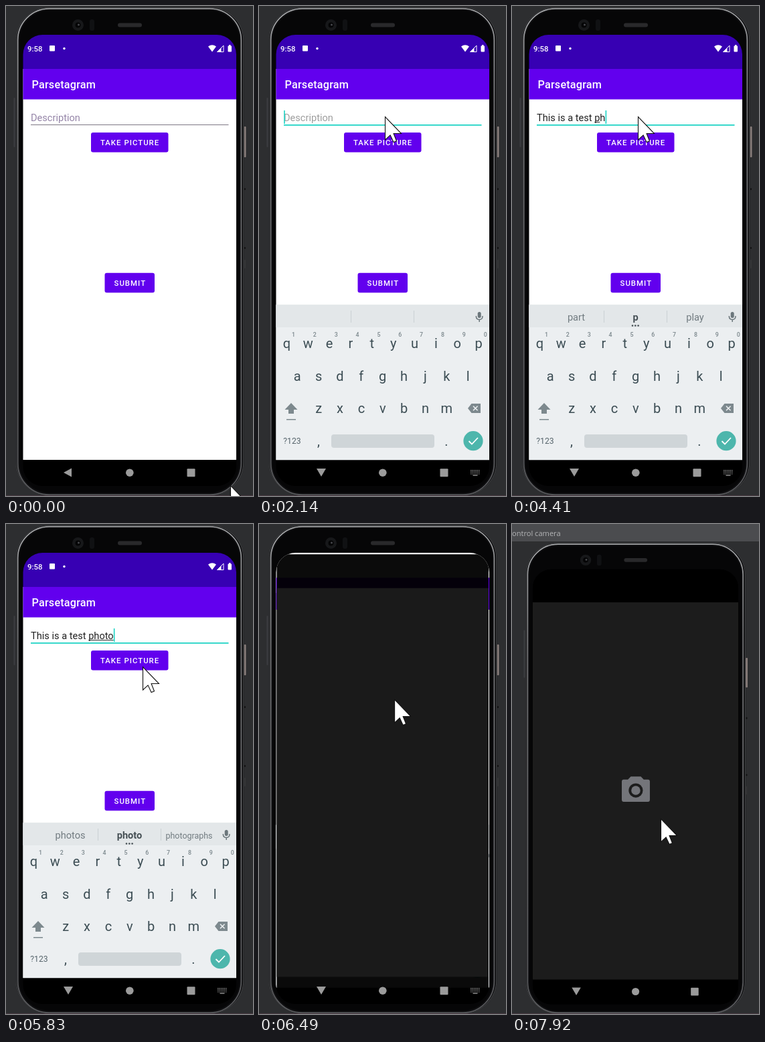
Write an HTML page with a canvas that moves like this. It is 369 by 732 pixels and loops after 8 s.

```html
<!DOCTYPE html>
<html lang="en">
<head>
<meta charset="utf-8">
<title>Phone demo</title>
<style>
html, body { margin: 0; height: 100%; overflow: hidden; background: #2d2e30; }
canvas { display: block; }
</style>
</head>
<body>
<canvas id="stage" width="369" height="732"></canvas>
<script>
const c = document.getElementById('stage').getContext('2d');
const LOOP = 8000, STEP = 31.85;
const MESSAGE = 'This is a test photo';

// time, x, y of the pointer tip
const POINTER = [
  [50, 335, 716], [190, 266, 273], [350, 266, 273], [700, 182, 150], [940, 205, 132],
  [1040, 205, 132], [1220, 210, 161], [1330, 210, 161], [1550, 188, 165], [5200, 188, 165],
  [5800, 204, 213], [6040, 204, 213], [6360, 201, 227], [6840, 205, 355], [6980, 226, 440],
  [7150, 226, 440], [7440, 222, 440]
];

// time, characters typed, suggestions
const TYPING = [
  [1140, 0, '||'], [2210, 1, '||'], [2280, 2, 'The|T|To'], [2350, 3, 'The|Th|This'],
  [2480, 4, 'Think|Thi|This'], [2550, 4, 'Thus|This|The'], [2750, 5, 'one|is|was'],
  [2785, 6, 'in|i|it'], [2820, 7, 'isn\'t|is|its'], [3410, 8, 'a|the|not'],
  [3480, 9, 'and|a|an'], [3550, 10, 'good|great|new'], [3620, 11, 'the|t|to'],
  [3690, 12, 'tell|te|ten'], [3820, 13, 'test|tes|yes'], [3890, 14, 'testing|test|tests'],
  [4280, 15, 'of|for|to'], [4345, 16, 'of|for|to'], [4410, 17, 'part|p|play'],
  [4550, 18, 'phone|ph|photo'], [4620, 19, 'phone|pho|photo'],
  [4690, 20, 'photos|phot|photo'], [4820, 20, 'photos|photo|photographs']
];

const clamp = v => Math.max(0, Math.min(1, v));
const progress = (t, from, to) => clamp((t - from) / (to - from));
const current = t => TYPING.filter(k => k[0] <= t).pop();

function box(x, y, w, h, r, color) {
  c.fillStyle = color;
  c.beginPath();
  c.roundRect(x, y, w, h, r);
  c.fill();
}
function outline(x, y, w, h, r, color, width) {
  c.strokeStyle = color;
  c.lineWidth = width;
  c.beginPath();
  c.roundRect(x, y, w, h, r);
  c.stroke();
}
function disc(x, y, r, color) {
  c.fillStyle = color;
  c.beginPath();
  c.arc(x, y, r, 0, 7);
  c.fill();
}
function shape(d, fill, stroke, width = 1) {
  const path = new Path2D(d);
  if (fill) { c.fillStyle = fill; c.fill(path); }
  if (stroke) { c.strokeStyle = stroke; c.lineWidth = width; c.stroke(path); }
}
function text(str, x, y, size, color, { weight = 400, align = 'left', spacing = 0, family = 'Roboto' } = {}) {
  c.font = `${weight} ${size}px "${family}", sans-serif`;
  c.textAlign = align;
  c.letterSpacing = spacing + 'px';
  c.fillStyle = color;
  c.fillText(str, x, y);
  return c.measureText(str).width;
}
// Windows zoom about the middle of the screen
function zoomed(s, draw) {
  c.save();
  c.translate(184.75, 380);
  c.scale(s, s);
  c.translate(-184.75, -380);
  draw();
  c.restore();
}

function device() {
  box(11.5, 137, 2, 74, 1, '#3c3d40');
  box(355.5, 180, 3, 46, 1, '#8a7e7c');
  for (const y of [272, 360]) box(356, y, 2, 3, 1, '#111');
  box(356, 379, 1.5, 13, 1, '#3a3a3c');
  box(14.5, 1.5, 341, 730, 50, '#101012');
  const metal = c.createLinearGradient(0, 0, 80, 732);
  metal.addColorStop(0, '#b4b6b8');
  metal.addColorStop(0.25, '#7a7b7d');
  metal.addColorStop(1, '#5c5d60');
  outline(15.3, 2.3, 339.4, 728.5, 49, '#3f4042', 1.2);
  outline(17.6, 4, 333.8, 726, 47, metal, 1.6);
  box(20, 6.5, 329, 721, 45, '#060607');
  disc(107.5, 28.5, 8.5, '#17181a');
  disc(107.5, 28.5, 4, '#050506');
  disc(108.5, 28, 1.5, '#46484c');
  box(125, 20, 7, 17, 3, '#101113');
  box(167, 25.5, 36, 6, 3, '#29292b');
}

function statusBar() {
  box(25, 43, 320, 51, 0, '#3700b3');
  text('9:58', 32, 68, 11.4, '#fff', { weight: 500 });
  box(65, 59, 8, 8.5, 1, '#fff');
  disc(87, 63.5, 1.7, '#fff');
  shape('M302 60.5Q308 56 314 60.5L308 68.5Z', '#fff');
  shape('M315.5 68.5L325 59V68.5Z', null, '#fff');
  shape('M315.5 68.5L321.5 62.5V68.5Z', '#fff');
  box(331.5, 59.5, 5.5, 9, 1, '#fff');
  box(333, 58, 2.5, 2, 0, '#fff');
}

function button(label, x, y, w, t) {
  box(x, y, w, 29.5, 3, '#6200ee');
  if (t > 5880 && t < 6260) {
    c.save();
    c.clip();
    disc(204, 213, 110 * progress(t, 5880, 6060), 'rgba(255,255,255,.2)');
    c.restore();
  }
  text(label, x + 14, y + 19, 11.4, '#fff', { weight: 500, spacing: 1.02 });
}

function app(t) {
  box(25, 94, 320, 584, 0, '#fff');
  box(25, 94, 320, 45.5, 0, '#6200ee');
  text('Parsetagram', 38.5, 123, 16.2, '#fff', { weight: 500, spacing: 0.2 });

  const focused = t >= 1140;
  if (focused) box(37, 177, 295.5, 1.8, 0, '#1bd3c4');
  else box(37, 177, 295.5, 1, 0, '#7d7784');

  const [lastKey, count, words] = current(t) || [0, 0, '||'];
  const typed = MESSAGE.slice(0, count);
  let width = 0;
  if (count) {
    width = text(typed, 37, 171.5, 14.6, '#212121');
    const word = typed.split(' ').pop(), known = words.split('|')[1];
    if (word && known && word.startsWith(known)) {
      const start = c.measureText(typed.slice(0, -word.length)).width;
      box(37 + start, 173, c.measureText(known).width, 1, 0, '#333');
    }
  } else {
    text('Description', 37, 171.5, 14.6, focused ? '#9e9e9e' : '#9585a8');
  }
  if (focused && ((t - lastKey) % 1000 < 500 || t > 6000)) {
    box(37.2 + width, 156, 1.6, 20, 0, '#1bd3c4');
  }
  button('TAKE PICTURE', 127, 189, 115.5, t);
  button('SUBMIT', 147.5, 398.7, 74.5, 0);
}

function suggestions(t) {
  box(25, 446.3, 320, 33.7, 0, '#e3e7e9');
  for (const x of [137, 231]) box(x, 455, 1, 18, 0, '#cbd1d4');
  const [, count, words] = current(t);
  words.split('|').forEach((word, i) => {
    const weight = i === 1 ? 700 : 400;
    c.letterSpacing = '0px';
    c.font = `${weight} 14.6px Roboto, sans-serif`;
    const size = 14.6 * Math.min(1, 70 / (c.measureText(word).width || 1));
    text(word, [96, 184.5, 273.5][i], 470, size, i === 1 ? '#454f54' : '#717b80', { weight, align: 'center' });
  });
  if (words !== '||' && MESSAGE[count - 1] !== ' ') {
    for (const x of [180, 184.3, 188.6]) disc(x, 477.5, 1.3, '#454f54');
  }
  box(326.7, 457, 5, 9, 2.5, '#6b767b');
  shape('M324.3 463Q324.3 468.5 329.2 468.5T334 463M329.2 468.5V472', null, '#6b767b', 1.5);
}

function keys(t) {
  const ink = '#3c4d54', grey = '#7d898e', center = { align: 'center' };
  box(25, 446.3, 320, 232.2, 0, '#eceff1');
  suggestions(t);
  [['qwertyuiop', 41.4, 511], ['asdfghjkl', 57.3, 559.7], ['zxcvbnm', 89.2, 608.4]].forEach(([row, x, y]) => {
    [...row].forEach((key, i) => text(key, x + i * STEP, y, 20, ink, center));
  });
  for (let i = 0; i < 10; i++) {
    text((i + 1) % 10, 51.5 + i * STEP, 494, 8.8, '#7b878c', { align: 'center', weight: 500 });
  }
  shape('M48 593L57.5 603H52V609H44V603H38.5Z', grey);
  box(41, 617, 14, 1.6, 0, grey);
  shape('M312 601L317.5 594H331V608H317.5Z', grey);
  shape('M320 597.7L326.6 604.3M326.6 597.7L320 604.3', null, '#eceff1', 1.6);
  text('?123', 49.5, 654, 12.2, '#56646b', center);
  text(',', 89, 657, 20, ink, center);
  box(108, 640, 154, 20, 4, '#cfd5d8');
  text('.', 280, 657, 20, ink, center);
  disc(320, 649.7, 14.6, '#4db6ac');
  shape('M313.5 650L318 654.5L327 645', null, '#fff', 1.8);
}

function keyboard(t) {
  c.save();
  c.beginPath();
  c.rect(25, 400, 320, 278.5);
  c.clip();
  c.translate(0, 232 * ((1 - progress(t, 1340, 1640)) ** 2 + progress(t, 7150, 7440) ** 2));
  keys(t);
  c.restore();
}

function navIcons(t) {
  const grey = '#9b9b9b';
  shape(t < 1400 ? 'M86 697L98 690.5V703.5Z' : 'M86 691H100L93 703Z', grey);
  disc(184.8, 697.2, 5.8, grey);
  box(270.5, 691.3, 12, 12, 1, grey);
  if (t < 1140 || t > 7700) return;
  for (let y = 0; y < 3; y++) {
    for (let x = 0; x < 6; x++) box(316 + x * 2.4, 693 + y * 2.6, 1.4, 1.4, 0, '#888');
  }
  box(319.5, 700.5, 7, 1.4, 0, '#888');
}

function camera(t) {
  box(25.5, 43, 318.5, 674, 0, '#000');
  box(25.5, 94, 318.5, 584.5, 0, '#1c1c1c');
  c.globalAlpha *= progress(t, 7590, 7880);
  shape('M177.5 364H193L197.5 368.5H204Q207 368.5 207 371.5V400Q207 403 204 403H166.5Q163.5 403 163.5 400V371.5Q163.5 368.5 166.5 368.5H173Z', '#74757a');
  disc(185.2, 385.5, 11, '#1c1c1c');
  disc(185.2, 385.5, 7, '#74757a');
}

function screen(t) {
  c.save();
  c.beginPath();
  c.roundRect(25.5, 43, 318.5, 674, 29);
  c.fillStyle = '#000';
  c.fill();
  c.clip();

  const opening = 1 - (1 - progress(t, 6260, 6660)) ** 3.65;
  if (opening < 1) {
    if (opening) box(25, 43, 320, 60, 0, '#fff');
    else statusBar();
    zoomed(1 + 0.05 * opening, () => {
      app(t);
      if (t > 1340) keyboard(t);
    });
  }
  if (opening) {
    c.globalAlpha = opening;
    zoomed(0.85 + 0.15 * opening, () => camera(t));
    c.globalAlpha = 1;
  }
  if (t >= 6700 && t < 7440) keyboard(t);
  navIcons(t);
  c.restore();
}

function pointer(t) {
  const next = POINTER.findIndex(k => k[0] > t);
  const b = POINTER.at(next), a = next < 0 ? b : POINTER[Math.max(0, next - 1)];
  const p = a === b ? 0 : progress(t, a[0], b[0]);
  c.save();
  c.translate(a[1] + (b[1] - a[1]) * p + 0.5, a[2] + (b[2] - a[2]) * p + 0.5);
  shape('M0 0V34.5L7.6 27.3L12.6 38L17 36.2L12.6 25H24Z', '#fff', '#111', 1.1);
  c.restore();
}

function draw(now) {
  const t = now % LOOP, shrunk = t >= 7180;
  box(0, 0, 369, 732, 0, '#2d2e30');
  c.save();
  if (shrunk) {
    box(0, 0, 369, 26, 0, '#4b4c4f');
    text('ontrol camera', 0, 18, 11.1, '#b4b5b7', { family: 'Open Sans' });
    c.translate(6.4, 26.4);
    c.scale(0.964, 0.964);
  }
  device();
  screen(t);
  c.restore();
  box(0, 731, 369, 1, 0, '#4a3b44');
  pointer(t);
  requestAnimationFrame(draw);
}
requestAnimationFrame(draw);
</script>
</body>
</html>
```
